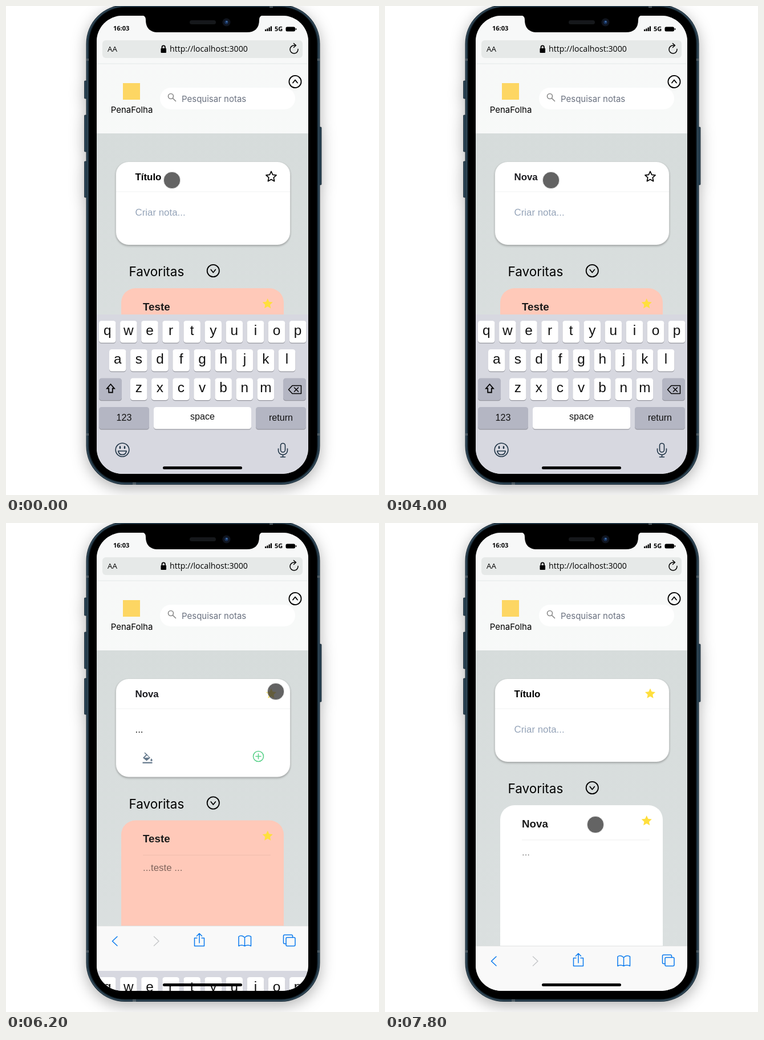
Write an HTML page that moves like this. It is 654 by 856 pixels and loops after 8 s.

```html
<!DOCTYPE html>
<html lang="pt">
<head>
<meta charset="utf-8">
<title>Notas</title>
<style>
html, body { margin: 0; width: 100%; height: 100%; overflow: hidden; background: #fff; }
svg { display: block; width: 654px; height: 856px; }
.phone { filter: drop-shadow(0 7px 13px rgba(0, 0, 0, .3)); }
.card { filter: drop-shadow(0 3px 1.5px rgba(0, 0, 0, .17)); }
.bar { font-family: "Open Sans", "Noto Sans", sans-serif; }
.ui { font-family: Inter, sans-serif; }
.note, #keys { font-family: "Liberation Sans", Arial, sans-serif; }
.line { fill: none; stroke: #000; stroke-width: 1.8; stroke-linecap: round; stroke-linejoin: round; }
.b { font-weight: 700; }
.mid { text-anchor: middle; }
</style>
</head>
<body>
<svg viewBox="0 0 654 856">
  <defs>
    <clipPath id="screen"><rect x="159" y="17" width="371" height="802" rx="45"/></clipPath>
    <linearGradient id="long" x1="0" y1="60" x2="0" y2="819" gradientUnits="userSpaceOnUse">
      <stop stop-color="#d5dbda"/><stop offset="1" stop-color="#dbe0e0"/>
    </linearGradient>
    <linearGradient id="short" x1="0" y1="60" x2="0" y2="728" gradientUnits="userSpaceOnUse">
      <stop stop-color="#d5dbda"/><stop offset="1" stop-color="#fff"/>
    </linearGradient>
    <g id="chevron" class="line"><circle r="10.6"/><path d="M-4 -2L0 3L4 -2"/></g>
  </defs>

  <g class="phone">
    <g fill="#2b4557" stroke="#16242e" stroke-width=".8">
      <rect x="137.5" y="131" width="5" height="31" rx="1"/>
      <rect x="137.5" y="191" width="5" height="64" rx="1"/>
      <rect x="137.5" y="272" width="5" height="63" rx="1"/>
      <rect x="548" y="212" width="5" height="101" rx="1"/>
    </g>
    <rect x="140.5" y="-2" width="410" height="840" rx="68" fill="#1b2d39"/>
    <rect x="142.5" y="0" width="406" height="836" rx="66" fill="none" stroke="#40596a" stroke-width="1.2"/>
    <rect x="145.5" y="2" width="400" height="831.5" rx="63"/>
    <path d="M462 1H468M222 836H228M141 94H145M141 750H145M546 94H550M546 750H550" stroke="#4c5a63" stroke-width="4"/>
  </g>

  <g clip-path="url(#screen)">
    <rect id="bg" x="159" y="17" width="371" height="802"/>
    <rect x="159" y="17" width="371" height="206" fill="#fff" fill-opacity=".82"/>
    <path d="M159 101H530" stroke="#e4e8e8"/>

    <!-- browser bar -->
    <g class="bar">
      <rect x="169" y="60" width="351" height="31" rx="6" fill="#e6e9e8"/>
      <text x="188" y="43" font-size="11" class="b">16:03</text>
      <text x="471" y="44" font-size="11" class="b">5G</text>
      <path d="M454 41h2.3v3h-2.3zM457.3 39.500h2.300v4.500h-2.300zM460.600 37.500h2.300v6.500h-2.300zM463.800 35.500h2.300v8.500h-2.300z"/>
      <rect x="490.500" y="36.500" width="16.500" height="8" rx="2.500"/>
      <path d="M508.500 39v3" stroke="#000" stroke-width="1.500"/>
      <text x="178" y="80" font-size="13.400">AA</text>
      <text x="287" y="80" font-size="14.150">http://localhost:3000</text>
      <rect x="271.500" y="74" width="9.500" height="8" rx="1"/>
      <path d="M273.500 75V72a2.700 2.700 0 0 1 5.400 0V75" class="line" stroke-width="1.500"/>
      <path d="M512 75.500A7 7 0 1 1 505 69H508M504.500 65.500L508.500 69L504.500 72.500" class="line" style="stroke-width:1.500"/>
    </g>

    <!-- page header -->
    <g class="ui">
      <rect x="205" y="135" width="30" height="29" fill="#fdd663"/>
      <text x="220.500" y="187" font-size="15" class="mid">PenaFolha</text>
      <rect x="270" y="143" width="237" height="38" rx="19" fill="#fff"/>
      <path d="M293.500 158A4.500 4.500 0 1 1 284.500 158A4.500 4.500 0 1 1 293.500 158M292.300 161.300L297.500 166.500" class="line" style="stroke:#8d8d8d;stroke-width:1.700"/>
      <text x="308" y="167.500" font-size="15" fill="#6b7280">Pesquisar notas</text>
      <use href="#chevron" transform="translate(507 132.500) scale(1 -1)"/>
    </g>

    <!-- lists below the editor -->
    <g id="lists">
      <text x="215.500" y="473" font-size="22.500" class="ui">Favoritas</text>
      <use href="#chevron" x="363.300" y="463.500"/>
      <g id="saved" class="note">
        <rect id="paper" x="202" y="494" width="285" height="420" rx="25"/>
        <text id="savedTitle" x="240" y="532.500" font-size="18.750" class="b" fill="#1a1a1a"></text>
        <path d="M240 554.800H464" stroke="#000" stroke-opacity=".07"/>
        <text id="savedBody" x="240" y="582" font-size="16.875" fill="#000" fill-opacity=".5"></text>
        <path class="star" transform="translate(458.700 521.500)" fill="#ffdf3d"/>
      </g>
      <g id="loading">
        <path d="M175 563H515" stroke="#dfe3e3" stroke-width="2"/>
        <text x="215.500" y="630" font-size="22.500" class="ui">Outras ...</text>
        <use href="#chevron" x="362.500" y="622"/>
        <path class="spin line"/><path class="spin line"/>
        <path d="M159 728H530V742H159Z" fill="#d5dbda"/>
      </g>
    </g>

    <!-- editor -->
    <g class="note" font-size="16.875">
      <rect x="190" y="272" width="311" height="148" rx="24" fill="#000" fill-opacity=".04" class="grow"/>
      <rect x="193" y="273" width="305" height="145" rx="22" fill="#fff" class="card grow"/>
      <path d="M193 325H498" stroke="#f1f2f2"/>
      <text id="title" x="226.500" y="304.500" class="b"></text>
      <text id="body" x="226.500" y="367"></text>
      <path id="caret" stroke="#111" stroke-width="1.200"/>
      <path id="mark" class="star" transform="translate(465 299)" stroke-width="1.700" stroke-linejoin="round"/>
      <g id="tools">
        <path d="M240 411L246.500 404.500L253 411L246.500 416.500ZM255 412q3.500 4.500 0 5q-3.500 -.5 0 -5ZM239.500 418.500H256.500V420.800H239.500Z" fill="#64788b"/>
        <path d="M242.800 411L247 406.500L251 410.500Z" fill="#fff"/>
        <path d="M243 402L248 407" stroke="#64788b" stroke-width="1.600"/>
        <g class="line" style="stroke:#5dd28c;stroke-width:1.600"><circle cx="442.500" cy="408.500" r="9"/><path d="M438 408.500H447M442.500 404V413"/></g>
      </g>
    </g>

    <g id="dot"><circle r="14.700" fill="#3d3d3d" fill-opacity=".8" stroke="#fff" stroke-opacity=".75"/></g>

    <g id="keys">
      <rect x="159" y="540" width="371" height="280" fill="#d7d8e0"/>
      <path d="M183.500 662L190 669.500H186.800V676.500H180.200V669.500H177Z" class="line" style="stroke-linejoin:miter"/>
      <path d="M495.500 671.500L502 664.500H517.500V678.500H502ZM505.500 668L512.500 675M512.500 668L505.500 675" class="line" style="stroke-width:1.500"/>
      <g class="line" style="stroke:#1e3345;stroke-width:1.600">
        <circle cx="204" cy="777" r="11.800"/><path d="M196.800 779H211.200Q210 785.500 204 785.500T196.800 779Z"/>
        <path d="M200 771.500v2.500M208 771.500v2.500" stroke-width="2.500"/>
        <rect x="481.500" y="765.500" width="8" height="15.500" rx="4"/>
        <path d="M477.500 775V778A8 7.500 0 0 0 493.500 778V775M485.500 785.500V789.500M481.500 789.500H489.500"/>
      </g>
    </g>

    <g id="toolbar">
      <rect x="159" y="740" width="371" height="79" fill="#f9f9f9"/>
      <path d="M159 740.500H530" stroke="#e0e2e2"/>
      <g class="line" style="stroke:#0a7aee;stroke-width:1.500">
        <path d="M195 759L186.500 767L195 775"/>
        <path d="M259.500 759L268 767L259.500 775" stroke="#c6c8ca" style="stroke:#c6c8ca"/>
        <path d="M335 761.500H330.500V775.500H347.500V761.500H343M339 770V754M334.500 758L339 753.500L343.500 758"/>
        <path d="M418.500 760.500Q413 755.500 408 759V775.500Q413 772.500 418.500 775.500Q424 772.500 429.500 775.500V759Q424 755.500 418.500 760.500V775.500"/>
        <rect x="491" y="760.500" width="16" height="15" rx="2"/>
        <path d="M491 771.500H488.500Q486.500 771.500 486.500 769.500V758Q486.500 756 488.500 756H500.500Q502.500 756 502.500 758V760.500"/>
      </g>
    </g>
  </g>

  <path d="M238 16Q245 17 245 24Q245 46 267 46H422Q444 46 444 24Q444 17 451 16Z"/>
  <rect x="322" y="25" width="46" height="7" rx="3.500" fill="#16181b"/>
  <circle cx="386.500" cy="28.500" r="7" fill="#10151f"/>
  <circle cx="386.500" cy="28.500" r="3.200" fill="#18325c"/>
  <circle cx="387" cy="27.500" r="1.300" fill="#4a7cb8"/>
  <rect x="275" y="806" width="139" height="5" rx="2.500"/>
</svg>
<script>
const $ = id => document.getElementById(id);
const all = cls => [...document.getElementsByClassName(cls)];
const show = (id, on) => $(id).style.display = on ? '' : 'none';
const move = (id, x, y) => $(id).setAttribute('transform', `translate(${x} ${y})`);
const put = (id, text) => { if ($(id).textContent !== text) $(id).textContent = text; };

const starPath = 'M' + Array.from({ length: 10 }, (_, i) => {
  const r = i % 2 ? 4.5 : 9.5, a = (i / 5 - .5) * Math.PI;
  return (r * Math.cos(a)).toFixed(2) + ' ' + (r * Math.sin(a)).toFixed(2);
}).join('L') + 'Z';
all('star').forEach(s => s.setAttribute('d', starPath));

function key(x, y, w, label, size, base, fill = '#fff') {
  const box = (dy, color) => `<rect x="${x}" y="${y + dy}" width="${w}" height="38.5" rx="4.5" fill="${color}"/>`;
  return box(1.2, '#96979f') + box(0, fill) +
    `<text class="mid" x="${x + w / 2}" y="${base}" font-size="${size}" fill="#111">${label}</text>`;
}
const grey = '#b4b6c3';
const row = (letters, x, y) => [...letters].map((c, i) => key(x + i * 37.1, y, 29.5, c, 24.4, y + 24.7)).join('');
$('keys').children[0].insertAdjacentHTML('afterend',
  row('qwertyuiop', 163, 551) + row('asdfghjkl', 181, 601) + row('zxcvbnm', 218, 651.5) +
  key(163, 651.5, 40, '', 16, 0, grey) + key(486, 651.5, 40, '', 16, 0, grey) +
  key(163, 702, 88, '123', 16.1, 726) + key(259, 702, 171, 'space', 16.1, 724) +
  key(438, 702, 88, 'return', 16.1, 726));
all('mid').filter(e => ['123', 'return'].includes(e.textContent))
  .forEach(e => e.previousElementSibling.setAttribute('fill', grey));

// [time, value] lists: last value reached, or values blended between times
const titles = [[0, ''], [500, 'N'], [1000, 'No'], [1500, 'Nov'], [1700, 'Nova'], [7100, '']];
const bodies = [[0, ''], [2800, '.'], [3400, '..'], [3600, '.'], [3900, ''], [4400, '.'], [4500, '..'], [4700, '...'], [7100, '']];
const growth = [[2700, 0], [2900, 1], [3800, 1], [4000, 0], [4300, 0], [4500, 1], [7000, 1], [7200, 0]];
const pathX = [[5100, 291], [5300, 304], [5600, 385], [5900, 468], [6000, 473], [6200, 473], [6500, 462], [6900, 447], [7200, 450], [7800, 369]];
const pathY = [[5100, 305], [5300, 340], [5600, 390], [5900, 310], [6000, 293], [6200, 295], [6500, 345], [6900, 412], [7200, 417], [7800, 528]];
const slide = [[6000, 0], [6100, 120], [6200, 244], [6300, 274], [6400, 279]];

const at = (list, t) => list.filter(k => k[0] <= t).pop()[1];
function blend(list, t) {
  const i = list.findIndex(k => k[0] > t);
  if (i < 0) return list[list.length - 1][1];
  if (!i) return list[0][1];
  const [a, va] = list[i - 1], [b, vb] = list[i];
  return va + (vb - va) * (t - a) / (b - a);
}

function draw(t) {
  const title = at(titles, t), body = at(bodies, t);
  const loading = t >= 7100 && t < 7500, done = t >= 7500, starred = t >= 6100;
  const extra = 26.5 * blend(growth, t);

  put('title', title || 'Título');
  $('title').setAttribute('fill', title ? '#1a1a1f' : '#000');
  put('body', body || 'Criar nota...');
  $('body').setAttribute('fill', body ? '#111' : '#94a3b8');

  const inTitle = t < 2100, blinkOff = t >= 5200 && t < 5700;
  show('caret', (inTitle ? title : body) && !blinkOff && t < 6100);
  const x = 227 + $(inTitle ? 'title' : 'body').getComputedTextLength();
  $('caret').setAttribute('d', `M${x} ${inTitle ? 290 : 351.5}v19`);

  all('grow').forEach((r, i) => r.setAttribute('height', 148 - i * 3 + extra));
  show('tools', body);
  move('tools', 0, extra - 26.5);
  $('mark').setAttribute('fill', starred ? '#ffdf3d' : 'none');
  $('mark').setAttribute('stroke', starred ? 'none' : '#000');

  move('lists', 0, extra);
  show('saved', !loading);
  show('loading', loading);
  $('bg').setAttribute('fill', loading ? 'url(#short)' : 'url(#long)');
  $('paper').setAttribute('fill', done ? '#fff' : '#ffc9b9');
  put('savedTitle', done ? 'Nova' : 'Teste');
  put('savedBody', done ? '...' : '...teste ...');
  all('spin').forEach((s, i) => {
    s.setAttribute('d', 'M1.500 -9.500A9.800 9.800 0 0 1 9.500 3');
    s.setAttribute('transform', `translate(345.500 ${512.5 + i * 158.5}) rotate(${(t - 7200) * .36})`);
  });

  const k = blend(slide, t);
  move('keys', 0, k);
  move('toolbar', 0, k - 279);
  show('keys', k < 279);
  show('toolbar', k > 0);
  move('dot', blend(pathX, t), blend(pathY, t));
}

const start = performance.now();
function tick() {
  const t = (performance.now() - start) % 8000;
  draw(Math.floor(t / 100) * 100);
  requestAnimationFrame(tick);
}
tick();
</script>
</body>
</html>
```
